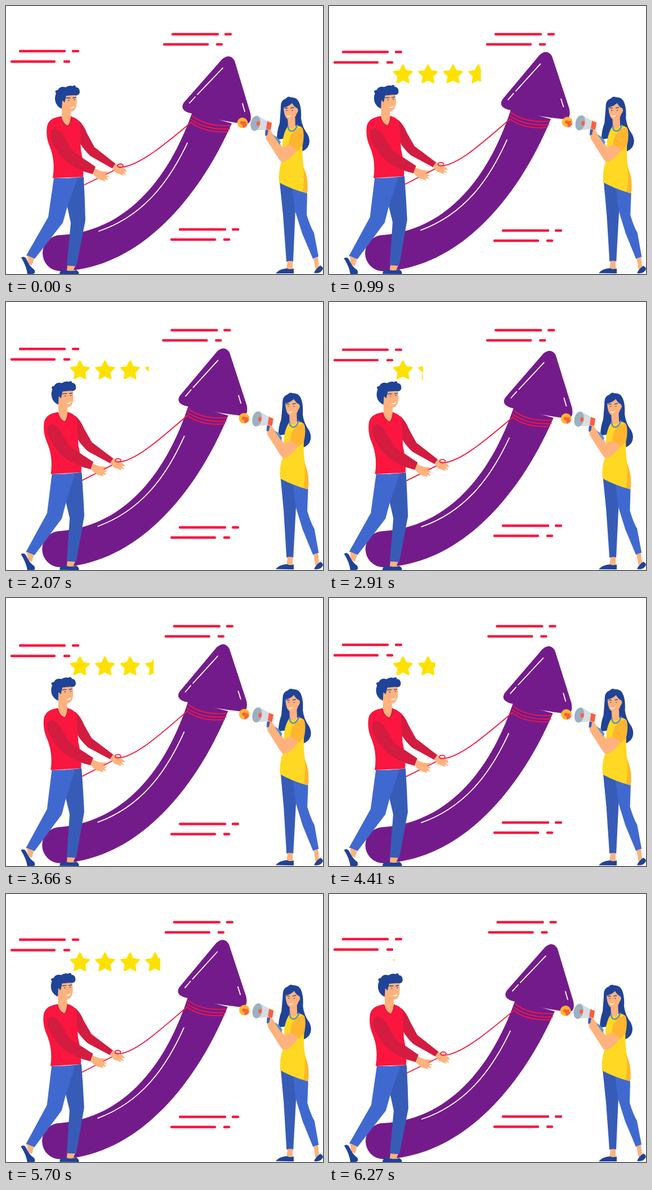
Write an HTML page that moves like this. It is 563 px wide and 475 px high and loops after 6300 ms.

```html
<!DOCTYPE html>
<html lang="en">
<head>
<meta charset="utf-8">
<title>Bending the arrow</title>
<style>
  html, body { margin: 0; width: 100%; height: 100%; overflow: hidden; background: #fff; }
  svg { display: block; width: 100vw; height: 100vh; }
  .red { fill: #fa163f; } .crimson { fill: #d31c40; }
  .skin { fill: #ffb27d; } .navy { fill: #1f4397; }
  .jean { fill: #4069cf; } .shade { fill: #375cb8; }
  .purple { fill: #741b8b; } .yellow { fill: #ffd823; } .amber { fill: #ffb52d; }
  .coral { fill: #ff5d3d; }
  .line { fill: none; stroke-linecap: round; stroke-linejoin: round; }
  .shine { stroke: #fff; stroke-width: 1.8; }
  .cord { stroke: #fa163f; stroke-width: 1.8; }
  .dash { stroke: #fa163f; stroke-width: 4.4; }
  .ink { stroke: #1f4397; stroke-width: 1.3; }
</style>
</head>
<body>
<svg viewBox="0 0 563 475">
  <defs><clipPath id="wipe"><rect id="reveal" x="112" y="95" height="50"/></clipPath></defs>

  <path id="left" class="line dash" d="M25 80H104M119 80H128M10 98.5H86M104 98.5H112"/>
  <path id="top" class="line dash" d="M296 50H376M390 50H399M281 68H358M375 68H383"/>
  <path id="low" class="line dash" d="M309 396H389M403 396H412M294 414H371M388 414H396"/>

  <g id="arrow">
    <path class="purple" d="M97 406C205 400 285 318 331 188L401 208C345 335 240 466 97 470A32 32 0 0 1 97 406Z"/>
    <path class="purple" d="M384 94Q398 83 406 97L434 190Q438 210 424 209Q375 203 324 189Q308 183 316 171Z"/>
    <path class="line shine" d="M385 110L340 157M336 161L326 172M420 173L424 187M165 399C245 372 290 310 322 243"/>
    <path class="line cord" d="M331 195Q355 214 398 212M329 201Q355 220 397 218M328 206Q352 225 394 223"/>
  </g>

  <path id="rope" class="line cord"/>

  <g id="man">
    <path class="line cord" d="M139 317L203 286"/>
    <path class="shade" d="M110 305L138 303Q140 340 141 380L125 461L108 460L115 384L108 352Z"/>
    <path class="jean" d="M85 305L127 305L110 352L101 384L51 448L36 442L75 374Z"/>
    <path class="skin" d="M38 442L50 448L46 460L39 456ZM109 460L123 461L119 470L108 469Z"/>
    <path class="navy" d="M27 446Q32 442 36 448Q42 462 50 467Q54 474 47 475L38 475Q36 460 27 446ZM95 475Q95 468 104 468Q116 471 125 468Q131 472 129 476Z"/>
    <path class="crimson" d="M128 202Q138 210 144 226L157 250L195 280L189 288L150 266Q135 252 128 236Z"/>
    <path class="skin" d="M194 280L204 284L213 290L215 294L209 293L214 299L207 297L209 301L196 296L189 287Z"/>
    <path class="red" d="M95 196Q76 199 73 213Q70 232 78 250Q88 275 83 305L137 303Q139 285 133 255L131 207Q126 198 116 196Z"/>
    <path class="crimson" d="M79 222Q87 211 100 226L118 257L159 285L154 298Q128 292 106 275Q90 260 79 235Z"/>
    <path class="skin" d="M158 288L170 293L184 294L176 298L184 303L178 303L182 309L175 307L177 311L164 307L154 298Z"/>
    <path class="skin" d="M99 175L115 186L115 197Q113 210 109 213Q100 207 99 197Z"/>
    <path class="line" stroke="#d31c40" stroke-width="1.5" d="M97 196Q100 209 110 213Q116 208 116 196"/>
    <path class="skin" d="M99 160L124 153Q127 168 125 177Q122 189 112 187Q101 184 98 172Z"/>
    <path class="navy" d="M99 182C89 178 84 166 89 155Q85 149 92 149Q96 141 106 144Q112 140 118 142Q124 139 124 144Q131 144 131 153Q130 160 121 158L107 159L104 171L100 167Z"/>
    <path class="line ink" d="M107 163L114 163M119 163L124 162M111 167h1M121 166h1"/>
    <path d="M112 180Q118 180 122 177Q120 184 112 180Z" fill="#fff"/>
    <ellipse class="line cord" cx="203" cy="283" rx="5" ry="3"/>
  </g>

  <g id="woman">
    <path class="navy" d="M488 181Q487 167 497 164Q501 159 506 162Q517 161 521 172Q525 182 524 199Q526 215 536 228Q542 240 536 250Q527 261 519 256L500 234L481 237Q481 222 486 208Z"/>
    <path class="shade" d="M486 312L514 322L514 360L510 453L498 453L492 370Z"/>
    <path class="jean" d="M508 320L535 331L534 370Q540 390 547 402L555 444L545 448L526 403L513 362Z"/>
    <path class="skin" d="M500 452H509L509 467H498ZM546 447L554 445L556 463L550 468Z"/>
    <path class="navy" d="M479 474Q485 466 499 465Q505 468 511 465L511 474ZM547 473Q550 466 558 460Q566 464 561 469Q556 475 547 473Z"/>
    <path class="yellow" d="M500 214Q494 222 491 240L492 270Q483 287 485 313Q510 326 535 332Q538 308 530 290Q524 268 528 222Q526 212 517 212Z"/>
    <path class="amber" d="M504 233Q512 217 526 215Q531 225 527 246L518 257L502 246ZM530 290Q537 308 535 332L527 329Q531 308 528 286Z"/>
    <path class="skin" d="M503 246L517 255Q508 269 495 276Q489 279 484 270L462 236L460 222L467 217L476 230L491 250Z"/>
    <path d="M474 228L482 233L488 241L486 246Z" fill="#5b8fc4"/>
    <path class="skin" d="M500 196L513 190L514 212Q509 221 501 214Z"/>
    <path class="line" d="M501 213Q501 222 508 222Q515 220 517 211" stroke="#5b8fc4" stroke-width="2.5"/>
    <path class="skin" d="M493 180Q501 179 508 172Q512 179 517 181Q521 185 516 191Q513 202 504 202Q494 201 493 180Z"/>
    <path class="line ink" d="M495 181L500 181M506 181L511 180M498 185h1M508 185h1"/>
    <path d="M498 194Q503 196 507 193Q503 200 498 194Z" fill="#fff"/>
    <path d="M446 194L466 205L463 219L441 221Z" fill="#d5dde3"/>
    <ellipse cx="443" cy="208" rx="8.5" ry="13.5" transform="rotate(12 443 208)" fill="#9db0bf"/>
    <ellipse class="coral" cx="448" cy="208.500" rx="3" ry="4"/>
    <path class="coral" d="M464 204L472 207L470 220L462 218Z"/>
    <path d="M461 219L466 220L464 229L460 230Z" fill="#375cb8"/>
    <circle class="amber" cx="420" cy="207" r="9.300"/>
    <path class="coral" d="M420 209L429 209Q427 215 421 216ZM416 207a3 3 0 1 1 6 0a3 3 0 1 1-6 0ZM422 205L427 205L426 210L421 210Z"/>
  </g>

  <g id="stars" clip-path="url(#wipe)" fill="#ffe100" stroke="#ffe100" stroke-width="3" stroke-linejoin="round"/>
</svg>
<script>
const LOOP = 6300, SWAY = LOOP / 4;
const el = id => document.getElementById(id);

// Piecewise linear track of [time, value] pairs
function track(t, keys) {
  const i = Math.max(1, keys.findIndex(k => k[0] >= t));
  const [t0, a] = keys[i - 1], [t1, b] = keys[i];
  return a + (b - a) * (t - t0) / (t1 - t0);
}

const wipeKeys = [[0, 0], [30, 2], [240, 60], [405, 126], [495, 139], [510, 148],
  [787, 213], [990, 156], [1335, 53], [1545, 2], [1575, 0]];
const topKeys = [[0, 0], [990, 0], [2070, -1.7], [2910, 0.2], [3660, 2.800], [5130, 2], [6300, 3.6]];
const lowKeys = [[0, 0], [990, 2], [2070, 3.5], [2910, 0.5], [3660, 4.500], [5130, -0.5], [6300, -1.5]];

const pivots = { arrow: [100, 472, -1.5], man: [85, 472, -1.32], woman: [520, 472, 0.69] };

function rotated(x, y, id, lean) {
  const [cx, cy, deg] = pivots[id], a = deg * lean * Math.PI / 180;
  const c = Math.cos(a), s = Math.sin(a);
  return [cx + (x - cx) * c - (y - cy) * s, cy + (x - cx) * s + (y - cy) * c];
}

function star(cx, cy) {
  let d = '';
  for (let i = 0; i < 10; i++) {
    const r = i % 2 ? 8.5 : 16.8, a = (i / 5 - 0.5) * Math.PI;
    d += (i ? 'L' : 'M') + (cx + r * Math.cos(a)).toFixed(2) + ' ' + (cy + r * Math.sin(a)).toFixed(2);
  }
  return `<path d="${d}Z"/>`;
}
el('stars').innerHTML = [0, 1, 2, 3, 4].map(i => star(131.3 + i * 44.5, 121.8)).join('');

function draw(t) {
  const shown = track(t % SWAY, wipeKeys), lean = shown / 156;
  el('reveal').setAttribute('width', 2 + shown);
  for (const id in pivots) {
    const [x, y, deg] = pivots[id];
    el(id).setAttribute('transform', `rotate(${deg * lean} ${x} ${y})`);
  }
  const [ax, ay] = rotated(329, 206, 'arrow', lean);
  const [hx, hy] = rotated(204, 286, 'man', lean);
  el('rope').setAttribute('d', `M${ax} ${ay}C${ax - 44} ${ay + 37} ${hx + 32} ${hy - 2} ${hx} ${hy}`);

  const drift = 5 * (1 - Math.abs(1 - 2 * t / LOOP));
  el('left').setAttribute('transform', `translate(0 ${drift})`);
  el('top').setAttribute('transform', `translate(${track(t, topKeys)} 0)`);
  el('low').setAttribute('transform', `translate(0 ${track(t, lowKeys)})`);
}

const start = performance.now();
function frame() {
  draw((performance.now() - start) % LOOP);
  requestAnimationFrame(frame);
}
frame();
</script>
</body>
</html>
```
